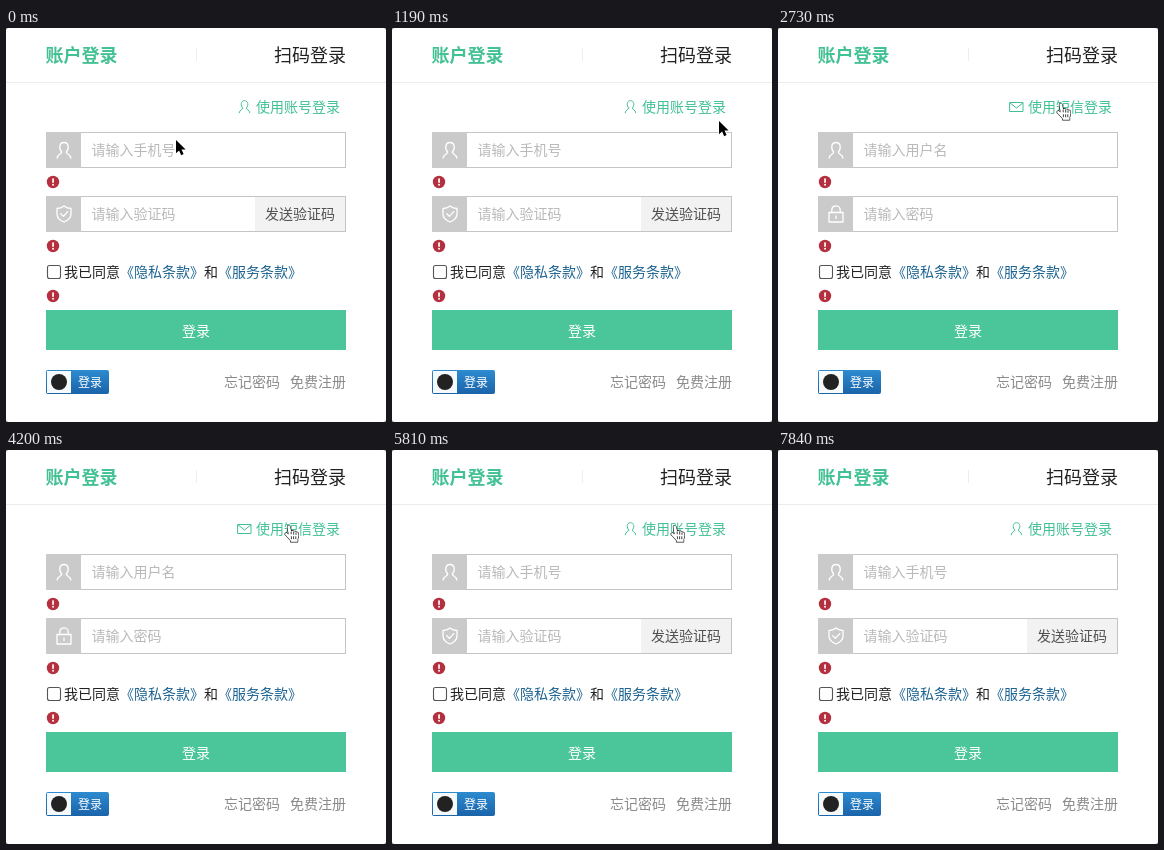
These frames come from a looping animation (380 by 394 pixels, 8120 ms). An HTML page with a canvas:

```html
<!DOCTYPE html>
<html lang="zh-CN">
<head>
<meta charset="utf-8">
<title>登录</title>
<style>
html, body { margin: 0; width: 100%; height: 100%; overflow: hidden; background: #fff; }
canvas { display: block; width: 380px; height: 394px; }
</style>
</head>
<body>
<canvas id="stage"></canvas>
<script>
const W = 380, H = 394, LOOP = 8120, STEP = 70;
const GREEN = '#42c194', BLUE = '#1b6290', GREY = '#8a8a8a';
const FONT = '"Noto Sans CJK SC", "Noto Sans CJK", "Noto Sans", sans-serif';
const canvas = document.getElementById('stage');
const c = canvas.getContext('2d');
const dpr = window.devicePixelRatio || 1;
canvas.width = W * dpr;
canvas.height = H * dpr;

// times at which the form toggles between phone and password login
const toggles = [2590, 4270, 5880, 7210];

// pointer hotspot: time, x, y
const route = [
  [0, 170, 112], [700, 318, 104], [910, 318, 104], [1190, 327, 93],
  [1400, 358, 86], [1680, 348, 82], [1960, 283, 76], [7280, 283, 76],
  [7770, 298, 386]
];

function text(str, x, midY, size, color, weight = 400) {
  c.font = `${weight} ${size}px ${FONT}`;
  c.fillStyle = color;
  c.fillText(str, x, midY + size * 0.38);
}

function rect(x, y, w, h, color) {
  c.fillStyle = color;
  c.fillRect(x, y, w, h);
}

function disc(x, y, r, color) {
  c.fillStyle = color;
  c.beginPath();
  c.arc(x, y, r, 0, Math.PI * 2);
  c.fill();
}

// strokes a path around a local origin
function icon(d, x, y, color, scale = 1, width = 1.3) {
  c.save();
  c.translate(x, y);
  c.scale(scale, scale);
  c.strokeStyle = color;
  c.lineWidth = width / scale;
  c.lineCap = c.lineJoin = 'round';
  c.stroke(new Path2D(d));
  c.restore();
}

const USER = 'M-2.3 2C-5.3-1-5-7.5 0-7.5S5.3-1 2.3 2C2 4 6.5 4 6.8 8M-2.3 2C-2 4-6.5 4-6.8 8';
const SHIELD = 'M0-8C-2-6.3-4.5-5.5-7-5.5V0C-7 4-3.5 6.5 0 8C3.5 6.5 7 4 7 0V-5.5C4.5-5.5 2-6.3 0-8ZM-3.2-.3L-.6 2.4L3.8-2.4';
const LOCK = 'M-7-1.5H7V8H-7ZM-4.2-1.5V-4C-4.2-9.5 4.2-9.5 4.2-4V-1.5M0 2V4.5';
const MAIL = 'M-6.5-4.5H6.5V4.5H-6.5ZM-6.3-4L0 1L6.3-4';
const ARROW = new Path2D('M0 0V13.2L3.1 10.4L5.2 15.2L7.6 14.1L5.5 9.4H9.6Z');
const HAND = new Path2D('M-1.6 1C-1.6-.6 1-.6 1.2 1L2.1 5.3C2.6 4.2 4.4 4.5 4.6 5.8C5.2 4.9 6.8 5.2 7 6.4C7.8 5.8 9.2 6.3 9.4 7.6C9.7 10 9.4 11.4 8.6 13V15.8H1.6V14.4C0 12.6-1.6 10.8-3.5 8.9C-4.7 7.5-3 6.3-1.6 7.4L-.3 8.6Z');

function field(y, d, hint) {
  rect(40, y, 300, 36, '#c4c4c4');
  rect(41, y + 1, 298, 34, '#fff');
  rect(40, y, 35, 36, '#cacaca');
  icon(d, 58, y + 18, '#fff');
  text(hint, 85.5, y + 18, 14, '#b9b9b9');
}

function warning(y) {
  disc(47, y, 6.2, '#b5303e');
  rect(46.2, y - 3.6, 1.7, 4.4, '#fff');
  rect(46.2, y + 1.9, 1.7, 1.7, '#fff');
}

function drawForm(phone) {
  rect(0, 0, W, H, '#888');
  c.fillStyle = '#fff';
  c.beginPath();
  c.roundRect(0, 0, W, H, 3);
  c.fill();

  text('账户登录', 39.5, 27, 18, GREEN, 700);
  text('扫码登录', 268, 27, 18, '#222');
  rect(190, 20, 1, 13, '#eee');
  rect(0, 54, W, 1, '#ececec');

  if (phone) icon(USER, 238.5, 78.5, GREEN, 0.78, 1);
  else icon(MAIL, 238.5, 79, GREEN, 1, 1);
  text(phone ? '使用账号登录' : '使用短信登录', 250, 79, 14, GREEN);

  field(104, USER, phone ? '请输入手机号' : '请输入用户名');
  field(168, phone ? SHIELD : LOCK, phone ? '请输入验证码' : '请输入密码');
  if (phone) {
    rect(249, 169, 90, 34, '#f2f2f2');
    text('发送验证码', 259, 186, 14, '#505050');
  }
  [154, 218, 268].forEach(warning);

  c.strokeStyle = '#555';
  c.lineWidth = 1.1;
  c.beginPath();
  c.roundRect(41.5, 237.5, 13, 13, 2);
  c.stroke();
  text('我已同意', 58, 244, 14, '#222');
  text('《隐私条款》', 114, 244, 14, BLUE);
  text('和', 198, 244, 14, '#222');
  text('《服务条款》', 212, 244, 14, BLUE);

  rect(40, 282, 300, 40, '#4bc59a');
  text('登录', 176, 302.5, 14, '#fff', 500);

  const blue = c.createLinearGradient(0, 342, 0, 366);
  blue.addColorStop(0, '#2d8bd0');
  blue.addColorStop(1, '#1a63a9');
  c.fillStyle = blue;
  c.beginPath();
  c.roundRect(40, 342, 63, 24, 2);
  c.fill();
  rect(41, 343, 24, 22, '#f7fafc');
  disc(53, 354, 8, '#222');
  text('登录', 72, 354.5, 12, '#fff');

  text('忘记密码', 218, 354, 14, GREY);
  text('免费注册', 284, 354, 14, GREY);
}

function pointerAt(t) {
  const i = route.findIndex(p => p[0] > t);
  if (i < 0) return route[route.length - 1].slice(1);
  const [t0, x0, y0] = route[i - 1], [t1, x1, y1] = route[i];
  const u = (t - t0) / (t1 - t0), e = u * u * (3 - 2 * u);
  return [x0 + (x1 - x0) * e, y0 + (y1 - y0) * e];
}

function drawPointer(t) {
  if (t >= 7840) return;
  const [x, y] = pointerAt(t);
  const onLink = x > 230 && x < 335 && y > 70 && y < 89;
  const onButton = x > 40 && x < 340 && y > 282 && y < 322;
  const hand = onLink || onButton;
  const shape = hand ? HAND : ARROW;
  c.save();
  c.translate(x, y);
  c.lineJoin = 'round';
  c.lineWidth = hand ? 1.2 : 1.6;
  c.strokeStyle = hand ? '#111' : '#fff';
  c.fillStyle = hand ? '#fff' : '#000';
  c.stroke(shape);
  c.fill(shape);
  if (hand) {
    c.lineWidth = 0.8;
    c.stroke(new Path2D('M2.2 5.5V8.3M4.7 6V8.6M7 6.6V8.8M2.4 10.3V13.2M4.6 10.3V13.2M6.8 10.3V13.2'));
  }
  c.restore();
}

function draw(now) {
  const t = Math.floor((now % LOOP) / STEP) * STEP;
  c.setTransform(dpr, 0, 0, dpr, 0, 0);
  drawForm(toggles.filter(s => t >= s).length % 2 === 0);
  drawPointer(t);
}

let start;
function tick(now) {
  start ??= now;
  draw(now - start);
  requestAnimationFrame(tick);
}
requestAnimationFrame(tick);
</script>
</body>
</html>
```
